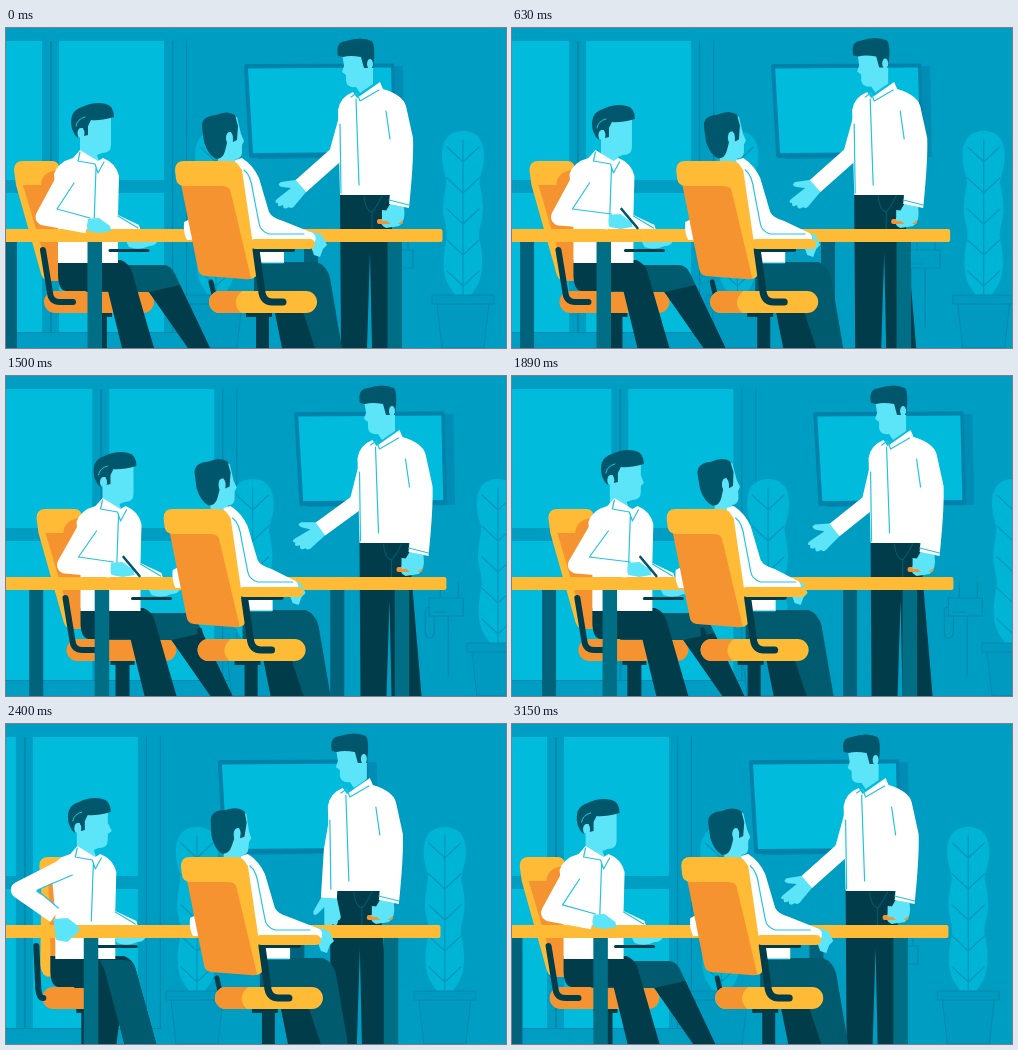
An HTML page for the animation above (3180 ms loop, 500 px wide and 320 px high).

```html
<!DOCTYPE html>
<html lang="en">
<head>
<meta charset="utf-8">
<title>Office meeting</title>
<style>
  html, body { margin: 0; width: 100%; height: 100%; overflow: hidden; background: #009dc3; }
  svg { display: block; width: 500px; height: 320px; }
</style>
</head>
<body>
<svg id="stage" viewBox="0 0 500 320"></svg>
<script>
const LOOP = 3180, CUT = 2040, STEP = 30;
const C = {
  wall: '#009dc3', glass: '#00bbdb', line: '#0088b0', frame: '#0082ab', leaf: '#00b4d5',
  skin: '#5ce4f8', hair: '#00576b', white: '#fff', fold: '#24c3e1',
  dark: '#003c49', far: '#005b6e', rear: '#00627b', leg: '#006e85',
  light: '#ffbb36', orange: '#f69331'
};
const KEYS = [-.78, 0, .63, 1.11, 1.5, 1.89];

const path = (d, fill) => `<path d="${d}" fill="${fill}"/>`;
const rect = (x, y, w, h, fill, r = 0) =>
  `<rect x="${x}" y="${y}" width="${w}" height="${h}" rx="${r}" fill="${fill}"/>`;
const stroke = (d, color, w = 1.2, cap = 'round') =>
  `<path d="${d}" fill="none" stroke="${color}" stroke-width="${w}" stroke-linecap="${cap}" stroke-linejoin="round"/>`;
const ear = (x, y, rx, ry) => `<ellipse cx="${x}" cy="${y}" rx="${rx}" ry="${ry}" fill="${C.skin}"/>`;
const move = (x, y, body, turn = 0, cx = 0, cy = 0) =>
  `<g transform="translate(${x} ${y}) rotate(${turn} ${cx} ${cy})">${body}</g>`;
const smooth = p => { p = Math.max(0, Math.min(1, p)); return p * p * (3 - 2 * p); };

// Eased value through one entry per key time.
function pose(u, ...v) {
  if (u <= KEYS[0]) return v[0];
  for (let i = 1; i < KEYS.length; i++)
    if (u < KEYS[i])
      return v[i - 1] + (v[i] - v[i - 1]) * smooth((u - KEYS[i - 1]) / (KEYS[i] - KEYS[i - 1]));
  return v[v.length - 1];
}

function wall() {
  const panes = [[-70, 106], [53, 105]].map(([x, w]) =>
    rect(x, 13, w, 139, C.glass) + rect(x, 165, w, 139, C.glass)).join('');
  const router = stroke('M373 222H407V240H373ZM384 222V206M402 222V206M378 240V256Q378 262 373 262Q369 262 369 256V236Q369 231 373 231M392 240V300M378 236H390', C.line);
  return panes + stroke('M45 13V304', C.line, 2, 'butt') +
    stroke('M166.5 13V304M180.5 13V304M-70 304.5H181', C.line) +
    path('M247 38L397 38L399 129L252 131Z', '#008db5') +
    path('M238 38Q238 36 241 36L388 35.5L391 127Q391 129 388 129L246 130Q243 130 243 127Z', C.frame) +
    path('M242 40.5L385 39.5L387 124L247 125Z', C.glass) + router;
}

function plant(x) {
  const half = path('M0 103C14 103 21 112 21 128S15 148 17 158S21 180 19 190S15 204 17 214S22 244 14 258L8 267H0Z', C.leaf);
  const veins = [134, 165, 196, 227, 258].map(y => `M-16 ${y - 15}L0 ${y}L16 ${y - 15}`).join('');
  return move(x, 0, half + `<g transform="scale(-1 1)">${half}</g>` +
    stroke('M0 112V267' + veins, '#0096bd') +
    `<path d="M-31 267H31V276H-31ZM-26 276L-21 320H21L26 276" fill="#0099bf" stroke="${C.line}"/>`);
}

function speaker(u) {
  const cx = pose(u, 333, 295, 295, 301, 295, 298);
  const cy = pose(u, 174, 158, 158, 165, 153, 154);
  const ex = pose(u, 336, 331, 331, 331, 332, 333);
  const turn = pose(u, -52, 0, 0, -8, 8, 4);
  const hand = path('M3 -7L-6 -6L-20 -4Q-25 -1 -19 1L-10 2L-24 13Q-28 17 -23 17Q-24 22 -18 19Q-18 25 -12 21Q-9 24 -5 18L6 5Z', C.skin);
  const head = path('M336 25H367V56L354 65L350 59Q341 60 340 53V47L336 44L338 38Z', C.skin) +
    path('M332 28Q329 14 340 13Q355 8 366 13Q369 17 368 31L367 40L358 40L355 29Q344 27 337 29Z', C.hair) +
    ear(364, 36, 3, 5);
  return move(13 * u, 0,
    path('M334 165H383L396 320H366L364 224L361 320H335Z', C.dark) +
    stroke('M358 168Q359 182 366 184M376 168Q370 180 366 184V205', '#00596d') +
    move(pose(u, 4, 0, 1, 2.5, 2.5, 2.5), pose(u, -1, 0, -.5, -1, -1, -1), head) +
    move(cx, cy, hand, turn) +
    path('M384 176L398 179Q400 194 393 198L380 200Q373 197 376 190Z', C.skin) +
    rect(371, 191, 26, 5, C.orange, 2) +
    path('M376 182L396 184L397 192L388 199L381 193L376 193Z', C.skin) +
    path('M347 64L351 70L374 54L377 61Q397 67 400 78L407 110Q408 130 403 180L383 176L384 167H334L332 82Q334 69 347 64Z', C.white) +
    stroke(`M344 79L${ex} 126L${cx} ${cy}`, C.white, 16, 'butt') +
    stroke('M334 96L335 165M350 71L353 157M345 69L351 65L354 73L373 62M380 83L384 111M383 172L403 177', C.fold));
}

function leftChair(s) {
  const x = (a, b) => a + (b - a) * s;
  const top = x(8, 45), low = x(36, 48), seat = x(38, 48), seatEnd = x(148, 118);
  return path(`M${top + 6} 145H${x(56, 86)}L${x(66, 90)} 253H${low + 4}Z`, C.orange) +
    path(`M${top} 142Q${top} 133 ${top + 9} 133H${x(46, 78)}Q${x(53, 84)} 133 ${x(54, 84)} 142L${x(42, 66)} 157H${top + 9}L${low + 9} 252H${low + 5}Q${low} 252 ${low - 2} 242L${top + 2} 157Z`, C.light) +
    path(`M${x(35, 66)} 157Q${x(35, 66)} 145 ${x(50, 78)} 142L${x(57, 86)} 170L${x(35, 66)} 175Z`, C.orange) +
    rect(82, 284, 24, 5, C.dark) + rect(87, 284, 14, 36, C.dark) +
    rect(seat, 263, seatEnd - seat, 22, C.orange, 11) +
    stroke(`M${x(37, 42)} 222L${x(44, 44)} 265Q${x(45, 45)} 274 ${x(54, 48)} 274H${x(67, 49)}`, C.dark, 6);
}

function leftMan(u, s) {
  const x = (a, b) => a + (b - a) * s;
  const hx = pose(u, 8.5, 0, 5.5, 5.4, 0, -4.5), hy = pose(u, -1, 0, 2, 2, 1, -1);
  const look = pose(u, 4, 0, 0, 0, 0, 3);
  const head = path(`M77 92L105 88V100L${105 + look} 108L105 111V117Q105 125 96 125L91 127L94 136L74 128V108Z`, C.skin) +
    path('M66 101Q62 83 76 79Q88 73 100 76Q108 78 108 89Q93 93 85 92L82 98L82 107L78 108L77 100Q71 99 72 110L69 107Z', C.hair) +
    ear(75, 105, 3.5, 5) + stroke('M70 98Q71 91 79 89', C.fold, 1);
  const farKnee = x(165, 122), farFoot = x(182, 100), foot = x(116, 130), knee = x(126, 141);
  const hip = x(52, 56);
  return path(`M75 237H${farKnee - 8}Q${farKnee} 237 ${farKnee + 4} 246L${farFoot + 22} 320H${farFoot}L${farKnee - 22} 264H80Z`, x(0, 1) > .5 ? C.dark : C.far) +
    path(`M${farKnee - 22} 264L${farKnee + 9} 257L${farFoot + 22} 320H${farFoot}Z`, C.dark) +
    path(`M${hip} 232H${knee - 11}Q${knee - 2} 236 ${knee} 244L${foot + 32} 320H${foot}L${knee - 24} 263H${hip + 8}Q${hip} 262 ${hip} 246Z`, C.dark) +
    (s > 0 ? `<g opacity="${s}">` + path(`M105 236H${knee - 11}Q${knee - 2} 236 ${knee} 244L${foot + 32} 320H${foot}L110 245Z`, C.far) + '</g>' : '') +
    move(hx, hy, head) +
    move(x(0, 9), 0,
      path('M74 122L92 133L97 130Q110 135 113 148L112 187L133 197L135 204H112V235H52V190L48 146Q52 134 67 130Z', C.white) +
      stroke('M74 124L72 133L89 136L92 145L98 134M90 140L88 197M112 188L132 200', C.fold)) +
    path('M118 209Q127 208 140 211L151 214Q149 218 143 218Q133 223 123 219Z', C.skin) +
    stroke('M104 222.5H142', C.dark, 3);
}

function writingArm(u, s) {
  const ex = pose(u, 25, 38, 38, 37, 37, 36), ey = pose(u, 166, 189, 189, 189, 189, 189);
  const hx = pose(u, 71, 91, 97, 91, 92, 97), hy = pose(u, 202, 198, 194, 194, 194, 194);
  const wx = hx - 10, wy = hy - 1 - 10 * s, sx = 64 + 10 * s, drop = 9 * s;
  const pen = u > .2 ? stroke(`M${hx + 3} ${hy - 13}L${hx + 19} ${hy + 6}`, C.hair, 2.6) : '';
  return path(`M${hx - 12} ${hy - 7}L${hx + 2} ${hy - 8}L${hx + 13} ${hy}L${hx + 14} ${hy + 5}L${hx + 2} ${hy + 7 + drop}L${hx - 9} ${hy + 5 + drop}Z`, C.skin) + pen +
    stroke(`M${sx} 141L${ex} ${ey}L${wx} ${wy}`, C.white, 17, 'butt') +
    stroke(`M${sx + 4} ${155 - 4 * s}L${ex + 13 + 5 * s} ${ey - 8 + 8 * s}L${wx + 3} ${wy - 7}`, C.fold);
}

function frontPair(u) {
  const reach = pose(u, 1, 0, -8, -9, -10, -11);
  const tip = 307 + reach * .6;
  const head = path('M214 94L231 89L235 106L238 113L236 117V125Q235 131 229 131L236 141L212 137V110Z', C.skin) +
    path('M198 114L196 99Q195 88 210 87Q221 82 229 87L232 98L231 112L227 114L225 104Q219 104 221 115L219 123Q217 131 210 131Q202 127 198 114Z', C.hair) +
    ear(223.5, 110, 3.5, 6);
  const chair =
    path('M220 144Q229 132 236 142L251 244Q251 250 244 251L236 246Z', C.light) +
    path('M175 156H218Q224 158 225 165L245 250Q244 252 238 251L199 248Q193 247 192 241Z', C.orange) +
    path('M169 142Q169 133 178 133H224Q233 133 235 143L237 153L225 168Q226 158 216 158H179Q171 158 170 151Z', C.light);
  return move(-7.6 * u, 0,
    path('M178 194L190 188V212H181Q177 205 178 194Z', C.white) +
    path('M248 234H311Q321 238 324 250L336 320H300L276 266H248Z', C.far) +
    path('M267 275L293 272L309 320H276Z', C.dark) +
    stroke('M205 254L208 267Q209 272 216 272', C.dark, 5) +
    move(pose(u, 0, 0, .7, 3, 4, 5), pose(u, -.5, 0, -.5, -1.5, -1.5, -1.5), head, pose(u, 5, 0, 0, 0, 0, -2), 218, 130) +
    move(reach, 0, path('M304 203L316 207L321 217L317 221L314 229L308 227L304 216Z', C.skin)) +
    path(`M229 132L236 130Q247 137 253 150L263 184Q266 190 277 193L${tip} 205Q${tip + 4} 208 ${tip + 2} 214H278V235H245Z`, C.white) +
    stroke('M238 142Q245 147 247 164L253 195Q254 203 263 206H298M253 235H277', C.fold) +
    rect(240, 284, 26, 5, C.dark) + rect(250, 284, 13, 36, C.dark) +
    rect(203, 263, 108, 22, C.light, 11) +
    path('M214 263H236Q224 274 235 285H214A11 11 0 0 1 214 263', C.orange) +
    chair +
    stroke('M250 222L256 265Q258 274 266 274H277', C.dark, 7) +
    stroke('M250 222H287', C.dark, 4) +
    rect(244, 211, 65, 10, C.light, 5));
}

function draw(t) {
  const u = (t >= CUT ? t - LOOP : t) / 1000;
  const swivel = pose(u, 1, 0, 0, 0, 0, 0);
  const near = 4.8 * u, back = 17.5 * u;
  return rect(0, 0, 500, 320, C.wall) +
    move(33.5 * u, 0, wall()) +
    plant(210 + 24.4 * u) + plant(457 + 23.3 * u) +
    rect(-3 + back, 212, 14, 108, C.rear) + rect(298 + back, 212, 14, 108, C.rear) +
    speaker(u) +
    move(15 * u, 0, leftChair(swivel) + leftMan(u, swivel)) +
    rect(81.5 + near, 212, 14.5, 108, C.leg) + rect(381.5 + near, 212, 14.5, 108, C.leg) +
    rect(-20, 201, 456.5 + 2.6 * u, 13, C.light, 2) +
    move(15 * u, 0, writingArm(u, swivel)) +
    frontPair(u);
}

const stage = document.getElementById('stage');
let shown = -1;
function tick() {
  const t = Math.floor((performance.now() % LOOP) / STEP) * STEP;
  if (t !== shown) stage.innerHTML = draw(shown = t);
  requestAnimationFrame(tick);
}
tick();
</script>
</body>
</html>
```
